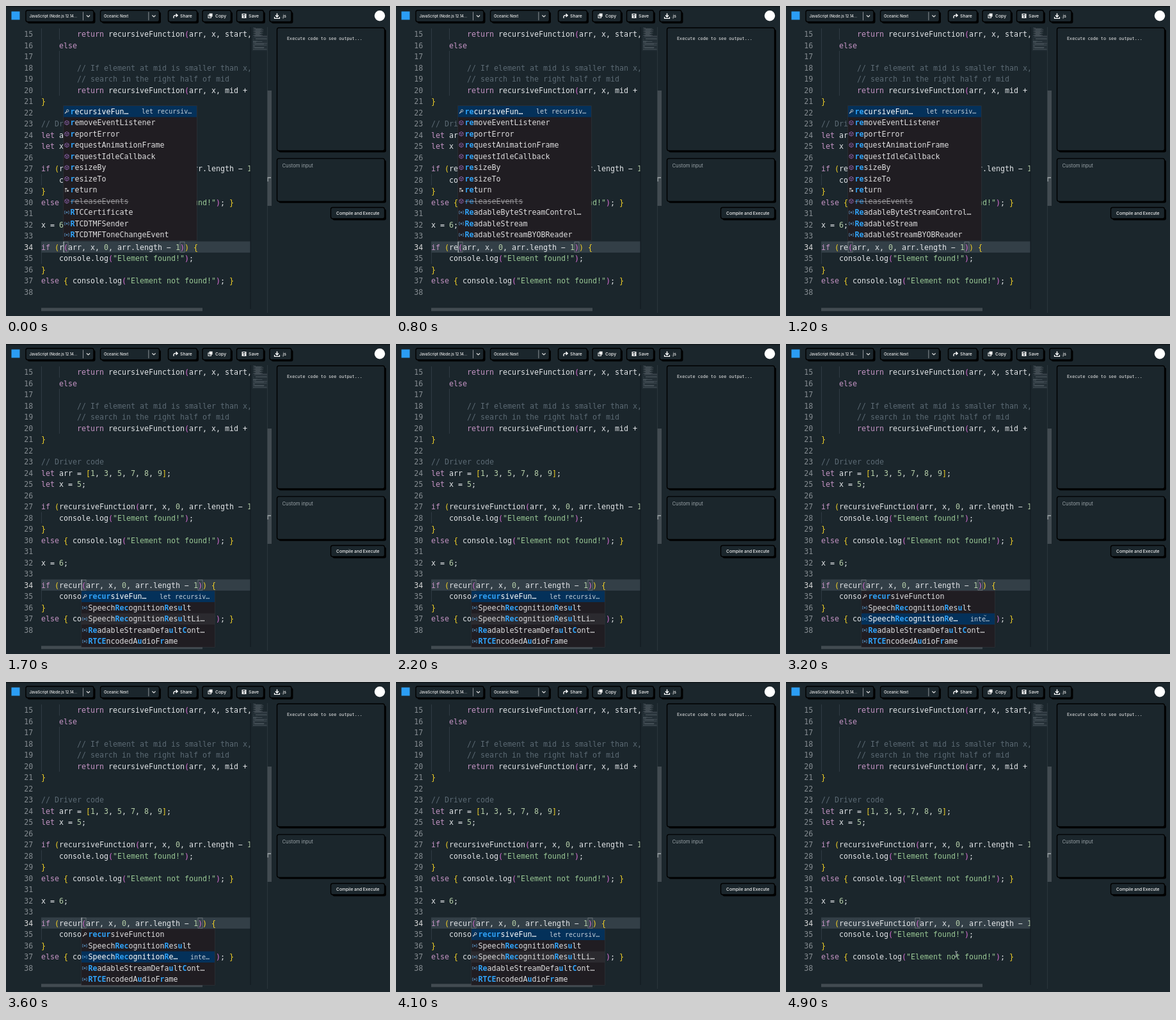
These frames come from a looping animation (600x484 px, 5000 ms). An HTML page with a canvas:

```html
<!DOCTYPE html>
<html lang="en">
<head>
<meta charset="utf-8">
<title>Code editor autocomplete</title>
<style>
html, body { margin: 0; width: 100%; height: 100%; overflow: hidden; background: #1b262c; }
canvas { display: block; width: 600px; height: 484px; }
</style>
</head>
<body>
<canvas id="stage"></canvas>
<script>
const W = 600, H = 484, LOOP = 5000;
const COL = 7, ROW = 17.5, LEFT = 55, FIRST = 15, TOP = 43.8;
const MONO = '"DejaVu Sans Mono", monospace', SANS = 'Inter, sans-serif';
const CODE_FONT = '11.63px ' + MONO, BOLD_FONT = 'bold ' + CODE_FONT;
const BG = '#1b262c', PLAIN = '#e2e5e8', MATCH = '#2fa3fa';

const canvas = document.getElementById('stage');
const scale = window.devicePixelRatio || 1;
canvas.width = W * scale;
canvas.height = H * scale;
const ctx = canvas.getContext('2d');

const CODE = [
  '        return recursiveFunction(arr, x, start, mid − 1);',
  '    else',
  '',
  '        // If element at mid is smaller than x,',
  '        // search in the right half of mid',
  '        return recursiveFunction(arr, x, mid + 1, end);',
  '}',
  '',
  '// Driver code',
  'let arr = [1, 3, 5, 7, 8, 9];',
  'let x = 5;',
  '',
  'if (recursiveFunction(arr, x, 0, arr.length − 1)) {',
  '    console.log("Element found!");',
  '}',
  'else { console.log("Element not found!"); }',
  '',
  'x = 6;',
  '',
  'if (@(arr, x, 0, arr.length − 1)) {',
  '    console.log("Element found!");',
  '}',
  'else { console.log("Element not found!"); }',
  ''
];
const ACTIVE = 34;

// Kinds: p property, m method, x deprecated, k keyword, i interface; matched letters in <>
const COMMON = ['p<re>cursiveFunction', 'm<re>moveEventListener', 'm<re>portError',
  'm<re>questAnimationFrame', 'm<re>questIdleCallback', 'm<re>sizeBy', 'm<re>sizeTo',
  'k<re>turn', 'x<re>leaseEvents'];
const LISTS = {
  r: COMMON.map(s => s.replace('<re>', '<r>e'))
    .concat('i<R>TCCertificate', 'i<R>TCDTMFSender', 'i<R>TCDTMFToneChangeEvent'),
  re: COMMON.concat('i<Re>adableByteStreamControl…', 'i<Re>adableStream', 'i<Re>adableStreamBYOBReader'),
  recur: ['p<recur>siveFunction', 'iSpeech<Rec>ognition<R>es<u>lt',
    'iSpeech<Rec>ognition<R>es<u>ltLi…', 'i<Re>adableStreamDefa<u>lt<C>ont…',
    'i<RTCE>ncodedA<u>dioF<r>ame']
};

const TYPING = [[0, 'r'], [600, 're'], [1300, 'rec'], [1450, 'recu'], [1600, 'recur'], [4200, 'recursiveFunction']];
const PICKS = [[0, 0], [2500, 1], [3100, 2], [3700, 1], [4000, 0]];
const at = (steps, t) => steps.filter(s => s[0] <= t).pop();

function rect(x, y, w, h, color) {
  ctx.fillStyle = color;
  ctx.fillRect(x, y, w, h);
}

// Centres the capital letters on y
function text(str, x, y, color, font, align = 'left') {
  const size = parseFloat(font.match(/[\d.]+(?=px)/)[0]);
  ctx.font = font;
  ctx.fillStyle = color;
  ctx.textAlign = align;
  ctx.fillText(str, x, y + size * 0.365);
}

function path(points, color, width = 1, close = false) {
  ctx.beginPath();
  points.forEach(([x, y], i) => i ? ctx.lineTo(x, y) : ctx.moveTo(x, y));
  if (close) ctx.closePath();
  ctx.strokeStyle = color;
  ctx.lineWidth = width;
  ctx.stroke();
}

function dot(x, y, r, color, hollow) {
  ctx.beginPath();
  ctx.arc(x, y, r, 0, Math.PI * 2);
  ctx.fillStyle = ctx.strokeStyle = color;
  ctx.lineWidth = 1;
  hollow ? ctx.stroke() : ctx.fill();
}

// Panel with a hard black shadow
function panel(x, y, w, h) {
  ctx.beginPath();
  ctx.roundRect(x + 2.5, y + 2.5, w, h, 3);
  ctx.fillStyle = '#000';
  ctx.fill();
  ctx.beginPath();
  ctx.roundRect(x, y, w, h, 3);
  ctx.fillStyle = BG;
  ctx.fill();
  ctx.strokeStyle = '#000';
  ctx.lineWidth = 1.4;
  ctx.stroke();
}

function select(x, w, label, size) {
  panel(x, 6.7, w, 18);
  text(label, x + 5.5, 15.7, '#eee', `500 ${size}px ${SANS}`);
  rect(x + w - 17, 9.3, 0.8, 13, '#aab0b4');
  const cx = x + w - 8.5;
  path([[cx - 2.6, 14.5], [cx, 17], [cx + 2.6, 14.5]], '#ddd', 1.2);
}

function button(x, w, label, tx) {
  panel(x, 6.7, w, 18);
  text(label, tx, 15.8, '#f2f2f2', `500 6.8px ${SANS}`);
}

function header() {
  rect(0, 0, W, 1.5, '#11171b');
  rect(8.5, 8.5, 13, 13, '#2b9df4');
  select(31, 106, 'JavaScript (Node.js 12.14...', 5.8);
  select(147.5, 92, 'Oceanic Next', 5.95);
  button(253.5, 45, 'Share', 272);
  path([[262, 19], [262, 16], [263.5, 14.7], [267, 14.7]], '#fff', 1.3);
  path([[265.5, 12.4], [268, 14.7], [265.5, 17]], '#fff', 1.5);
  button(307, 44.5, 'Copy', 327);
  ctx.strokeStyle = '#eee';
  ctx.lineWidth = 1;
  ctx.strokeRect(316, 14, 4.5, 4.5);
  rect(317.6, 11.6, 5, 5, '#eee');
  button(360.5, 42, 'Save', 379);
  rect(368.5, 12, 7, 7, '#eee');
  rect(370, 13, 3.5, 1.6, BG);
  dot(372, 17, 1.1, BG);
  button(412, 34, '.js', 430.5);
  path([[423.5, 11.5], [423.5, 17]], '#fff', 1.5);
  path([[421, 14.6], [423.5, 17], [426, 14.6]], '#fff', 1.4);
  path([[419.5, 17], [419.5, 19.3], [427.5, 19.3], [427.5, 17]], '#fff', 1.2);
  dot(584, 15.2, 8.2, '#fff');
}

function sidePanels() {
  panel(423.5, 34, 168, 192);
  text('Execute code to see output...', 439, 50.7, '#f0f0f0', '6.76px ' + MONO);
  panel(423.5, 238.1, 168, 67);
  text('Custom input', 431.5, 249, '#98a1a6', '7.7px ' + SANS);
  panel(507.5, 314.5, 84, 17.5);
  text('Compile and Execute', 516, 323.5, '#f2f2f2', '500 6.7px ' + SANS);
}

const TOKEN = /\/\/.*|"[^"]*"|[A-Za-z]+|\d+|[()[\]{}]|[^\sA-Za-z\d()[\]{}"]/g;
const KEYWORD = /^(return|else|if|let)$/;

function codeLine(line, y, depth) {
  for (const { 0: tok, index } of line.matchAll(TOKEN)) {
    let color = PLAIN;
    if (tok.startsWith('//')) color = '#5b6973';
    else if (tok[0] === '"') color = '#99c794';
    else if (KEYWORD.test(tok)) color = '#c594c5';
    else if (/\d/.test(tok)) color = '#b5cea8';
    else if (/[([{]/.test(tok)) color = depth++ % 2 ? '#da70d6' : '#f5d327';
    else if (/[)\]}]/.test(tok)) color = --depth % 2 ? '#da70d6' : '#f5d327';
    text(tok, LEFT + index * COL, y, color, CODE_FONT);
  }
  return depth;
}

const lineY = n => TOP + (n - FIRST) * ROW;

function bracketBox(col) {
  ctx.strokeStyle = '#737b81';
  ctx.lineWidth = 0.8;
  ctx.strokeRect(LEFT + col * COL, lineY(ACTIVE) - 8, COL, 16);
}

function editor(word, caretOn) {
  const y34 = lineY(ACTIVE), col = 4 + word.length;
  ctx.save();
  ctx.beginPath();
  ctx.rect(0, 33, 382, 440);
  ctx.clip();
  rect(LEFT, y34 - 8.75, 330, ROW, '#333f47');
  [[15, 20, 0], [15, 15, 4], [17, 20, 4], [28, 28, 0], [35, 35, 0]].forEach(([a, b, c]) =>
    rect(LEFT + c * COL, lineY(a) - 8.75, 0.8, (b - a + 1) * ROW, '#35424a'));
  bracketBox(col);
  bracketBox(col + 26);
  let depth = 1;
  CODE.forEach((line, i) => {
    const n = FIRST + i, y = lineY(n);
    text(n, 42.3, y, n === ACTIVE ? '#d8d8d8' : '#858c91', CODE_FONT, 'right');
    depth = codeLine(line.replace('@', word), y, depth);
  });
  if (caretOn) rect(LEFT + col * COL - 0.3, y34 - 8.5, 1, 17, '#c0c5ca');
  ctx.restore();
}

function minimap() {
  rect(381.5, 33, 1.2, 440, '#131b20');
  rect(385, 46, 23, 24, 'rgba(121,130,138,.1)');
  for (let i = 0; i < 38; i++) {
    const line = i < 14 ? ' '.repeat(4 * (i % 3)) + 'x'.repeat(8 + i * 17 % 26) : CODE[i - 14];
    const body = line.trim().length, pad = line.length - line.trimStart().length;
    const w = Math.min(body * 0.5, 22 - pad * 0.5);
    rect(386 + pad * 0.5, 34 + i * 0.92, w, 0.6, line.includes('//') ? '#3b474e' : '#59636a');
  }
  rect(408, 33, 0.8, 446, '#303b42');
  rect(408.5, 132, 6.5, 180, '#424b51');
  rect(408.5, 267, 5.5, 7, '#8c9397');
  rect(410, 269, 5, 6, '#424b51');
  rect(LEFT, 471.3, 252, 5, '#424b51');
}

function icon(kind, x, y) {
  if (kind === 'p') {
    path([[x - 3, y + 3], [x, y]], '#c5c5c5', 1.3);
    dot(x + 1.2, y - 1.2, 1.7, '#c5c5c5', true);
  } else if (kind === 'm' || kind === 'x') {
    const c = '#9a6cbd';
    path([[x, y - 3.4], [x + 3, y - 1.8], [x + 3, y + 1.8], [x, y + 3.4], [x - 3, y + 1.8], [x - 3, y - 1.8]], c, 0.8, true);
    path([[x - 3, y - 1.8], [x, y], [x + 3, y - 1.8]], c, 0.7);
    path([[x, y], [x, y + 3.4]], c, 0.7);
  } else if (kind === 'k') {
    rect(x - 3, y - 3, 3.5, 2, '#b5b5b5');
    rect(x - 3, y, 2, 1, '#b5b5b5');
    rect(x, y, 3, 2.6, '#b5b5b5');
    rect(x - 3, y + 2, 2, 1, '#b5b5b5');
  } else {
    const c = '#5b9ccf';
    path([[x - 2, y - 2.2], [x - 3.3, y - 2.2], [x - 3.3, y + 2.2], [x - 2, y + 2.2]], c, 0.7);
    path([[x + 2, y - 2.2], [x + 3.3, y - 2.2], [x + 3.3, y + 2.2], [x + 2, y + 2.2]], c, 0.7);
    dot(x, y, 1, c, true);
  }
}

function label(marked, x, y, limit, color) {
  let n = 0, hit = false;
  for (const ch of marked) {
    if (ch === '<' || ch === '>') { hit = ch === '<'; continue; }
    const cut = n === limit - 1;
    text(cut ? '…' : ch, x + n * COL, y, hit && !cut ? MATCH : color, hit && !cut ? BOLD_FONT : CODE_FONT);
    n++;
    if (cut) break;
  }
  return n;
}

function popup(word, pick) {
  const below = word.length > 2;
  const items = LISTS[below ? 'recur' : word];
  const x = LEFT + (4 + word.length) * COL, y = below ? 385.5 : 156;
  const w = 208, h = items.length * ROW;
  rect(x - 0.5, y - 0.5, w + 1, h + 1, '#36353b');
  rect(x, y, w, h, '#201d22');
  items.forEach((item, i) => {
    const cy = y + (i + 0.5) * ROW, on = i === pick;
    if (on) rect(x, y + i * ROW, w, ROW, '#04315a');
    else if (below && i === 2) rect(x, y + i * ROW, w, ROW, '#2b2a2f');
    const old = item[0] === 'x';
    const limit = !on ? 99 : [13, 17, 20][i];
    icon(item[0], x + 5, cy);
    ctx.globalAlpha = old ? 0.6 : 1;
    const n = label(item.slice(1), x + 10.5, cy, limit, on ? '#fff' : '#dededf');
    if (old) rect(x + 10.5, cy, n * COL, 0.9, '#dededf');
    ctx.globalAlpha = 1;
    if (on) {
      const note = ['let recursiv…', 'interfa…', 'inte…'][i];
      text(note, x + [122, 150, 170][i], cy, '#c3ced8', '10px ' + MONO);
    }
  });
}

function pointer(t) {
  if (t < 4300) return;
  const p = Math.min(1, (t - 4300) / 400);
  const x = 311 - 45 * p * p * (3 - 2 * p), y = 425;
  path([[x - 2, y - 4.5], [x, y - 3.5], [x + 2, y - 4.5]], '#c9cdd0', 0.9);
  path([[x, y - 3.5], [x, y + 3.5]], '#c9cdd0', 0.9);
  path([[x - 2, y + 4.5], [x, y + 3.5], [x + 2, y + 4.5]], '#c9cdd0', 0.9);
}

function draw(t) {
  const [since, word] = at(TYPING, t);
  ctx.setTransform(scale, 0, 0, scale, 0, 0);
  rect(0, 0, W, H, BG);
  header();
  sidePanels();
  editor(word, Math.floor((t - since) / 450) % 2 === 0);
  minimap();
  if (word.length < 6) popup(word, at(PICKS, t)[1]);
  if (t >= 3100 && t < 3400) path([[309.5, 423], [311.5, 425], [312.5, 423.5]], '#9fb0be', 0.9);
  pointer(t);
}

const start = performance.now();
function tick() {
  draw((performance.now() - start) % LOOP);
  requestAnimationFrame(tick);
}
tick();
</script>
</body>
</html>
```
